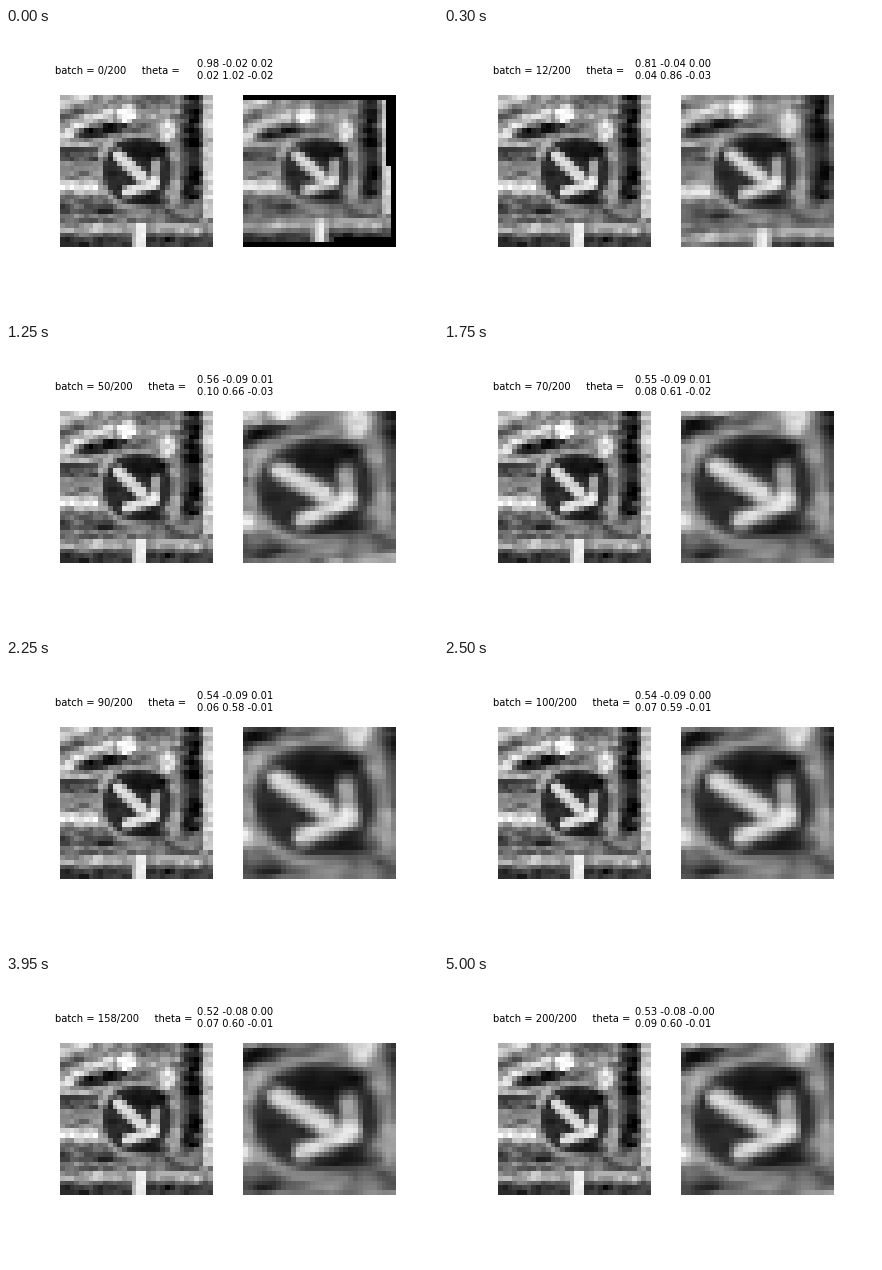
Write a matplotlib script that moves like this. It is 432 px wide and 288 px high and loops after 5050 ms.

```python
import numpy as np
import matplotlib.pyplot as plt
from matplotlib.animation import FuncAnimation

W, H, DPI = 432, 288, 72
N = 32
FRAMES, INTERVAL = 101, 50
BATCHES = 200

rows, cols = np.mgrid[0:N, 0:N].astype(float)


def paint(img, mask, tone):
    img += np.clip(mask, 0, 1) * (tone - img)


def box(img, c0, r0, c1, r1, tone):
    inside = (cols >= c0) & (cols <= c1) & (rows >= r0) & (rows <= r1)
    paint(img, inside.astype(float), tone)


def blob(img, cx, cy, rx, ry, tone):
    d = np.hypot((cols - cx) / rx, (rows - cy) / ry)
    paint(img, 0.5 + (1 - d) * min(rx, ry), tone)


def stroke(img, x0, y0, x1, y1, half, tone):
    dx, dy = x1 - x0, y1 - y0
    t = np.clip(((cols - x0) * dx + (rows - y0) * dy) / (dx * dx + dy * dy), 0, 1)
    d = np.hypot(cols - x0 - t * dx, rows - y0 - t * dy)
    paint(img, 0.5 + half - d, tone)


def grain(rng, size):
    """Noise that is smeared a little along each row."""
    n = rng.normal(0, size, (N, N))
    return (n + np.roll(n, 1, axis=1)) / 2


def street_sign():
    rng = np.random.default_rng(5)
    img = np.full((N, N), 0.48)

    # mottled foliage
    box(img, 0, 0, 24, 10, 0.54)
    stroke(img, 0, 1, 5, 0, 1.2, 0.8)
    stroke(img, 0, 4.5, 3.5, 2.8, 0.8, 0.32)
    stroke(img, 0, 8.5, 5, 5, 1.0, 0.85)
    stroke(img, 4, 5.4, 10.5, 3, 0.9, 0.78)
    stroke(img, 4, 8, 12.5, 6.2, 1.1, 0.14)
    stroke(img, 14, 6.8, 19, 6.2, 0.8, 0.36)
    stroke(img, 17, 1, 22, 0, 1.0, 0.38)
    stroke(img, 17, 3.5, 22, 3, 1.0, 0.6)
    stroke(img, 0, 10, 7, 9.5, 0.8, 0.62)
    blob(img, 13.4, 3.5, 1.9, 2.0, 0.98)

    # wall and ground
    box(img, 0, 11, 8, 13, 0.28)
    box(img, 0, 14, 8, 17, 0.52)
    box(img, 0, 18, 8, 19, 0.88)
    box(img, 0, 20, 8, 20, 0.65)
    box(img, 0, 21, 31, 25, 0.42)
    box(img, 0, 23, 10, 24, 0.28)
    box(img, 0, 26, 31, 26, 0.42)
    box(img, 0, 27, 31, 28, 0.66)
    box(img, 0, 29, 31, 29, 0.36)
    box(img, 0, 30, 31, 31, 0.2)

    # pole on the right
    box(img, 23, 8, 24, 21, 0.58)
    box(img, 30, 0, 31, 25, 0.8)
    box(img, 25, 0, 29, 22, 0.32)
    box(img, 26, 0, 28, 21, 0.08)
    box(img, 26, 0, 26, 21, 0.2)
    blob(img, 22.1, 7.1, 1.5, 1.8, 0.9)
    img += grain(rng, 0.1)

    # round sign with its arrow
    blob(img, 15.7, 15.8, 8.5, 8.3, 0.58)
    stroke(img, 7.8, 12, 10, 9.3, 0.6, 0.74)
    stroke(img, 8.2, 19, 11.5, 22, 0.6, 0.64)
    stroke(img, 23.3, 22.5, 24, 18, 0.4, 0.7)
    blob(img, 15.7, 15.6, 7.2, 7.1, 0.16)
    blob(img, 18, 11.2, 4.2, 2.0, 0.08)
    blob(img, 18.6, 21.8, 3.2, 1.2, 0.1)
    stroke(img, 19.6, 14, 19.3, 18, 1.05, 0.64)
    stroke(img, 13.5, 19.9, 19.1, 18.2, 1.05, 0.86)
    stroke(img, 11.7, 12.3, 16.6, 16.7, 1.25, 0.87)
    blob(img, 19.2, 17.7, 1.1, 1.1, 0.93)

    box(img, 16, 27, 17, 31, 0.92)
    box(img, 15, 27, 15, 31, 0.68)
    img += grain(rng, 0.03)
    return np.clip(img, 0, 1)


# batch number followed by the six affine parameters
KEYS = np.array([
    [0, 0.98, -0.02, 0.02, 0.02, 1.02, -0.02],
    [26, 0.68, -0.06, -0.01, 0.06, 0.75, -0.03],
    [50, 0.56, -0.09, 0.01, 0.10, 0.66, -0.03],
    [90, 0.54, -0.09, 0.01, 0.06, 0.58, -0.01],
    [118, 0.55, -0.08, -0.01, 0.09, 0.61, -0.02],
    [158, 0.52, -0.08, 0.001, 0.07, 0.60, -0.01],
    [200, 0.53, -0.08, -0.002, 0.09, 0.60, -0.01],
])


def progress(batch):
    # fast learning first, then a slow drift
    return 1 - np.exp(-batch / 24) + batch / 300


def theta_at(batch):
    u = progress(KEYS[:, 0])
    return [np.interp(progress(batch), u, k) for k in KEYS[:, 1:].T]


def warp(img, th):
    """Bilinear affine sampling; points past the border come out black."""
    gx, gy = np.meshgrid(np.linspace(-1, 1, N), np.linspace(-1, 1, N))
    x = (th[0] * gx + th[1] * gy + th[2] + 1) * N / 2
    y = (th[3] * gx + th[4] * gy + th[5] + 1) * N / 2
    x0, y0 = np.floor(x).astype(int), np.floor(y).astype(int)
    inside = (x0 >= 0) & (x0 < N - 1) & (y0 >= 0) & (y0 < N - 1)
    x0, y0 = np.clip(x0, 0, N - 2), np.clip(y0, 0, N - 2)
    fx, fy = x - x0, y - y0
    top = img[y0, x0] * (1 - fx) + img[y0, x0 + 1] * fx
    low = img[y0 + 1, x0] * (1 - fx) + img[y0 + 1, x0 + 1] * fx
    return np.where(inside, top * (1 - fy) + low * fy, 0)


fig = plt.figure(figsize=(W / DPI, H / DPI), dpi=DPI, facecolor="white")


def panel(left, data):
    ax = fig.add_axes([left / W, 1 - 219 / H, 152.18 / W, 152 / H])
    ax.axis("off")
    return ax.imshow(data, cmap="gray", vmin=0, vmax=1,
                     interpolation="nearest", aspect="auto")


def label(x, baseline):
    return fig.text(x / W, 1 - baseline / H, "", fontsize=10,
                    family="DejaVu Sans", color="black", va="baseline")


sign = street_sign()
panel(54, sign)
view = panel(236.62, sign)
counter = label(49.4, 46)
matrix = [label(191.4, 39), label(191.4, 51)]


def update(i):
    batch = 2 * i
    th = theta_at(batch)
    view.set_data(warp(sign, th))
    counter.set_text(f"batch = {batch}/{BATCHES}     theta = ")
    for line, part in zip(matrix, (th[:3], th[3:])):
        line.set_text(" ".join(f"{v:.2f}" for v in part))
    return [view, counter, *matrix]


anim = FuncAnimation(fig, update, frames=FRAMES, interval=INTERVAL,
                     repeat=True, repeat_delay=0, blit=False)
plt.show()
```
